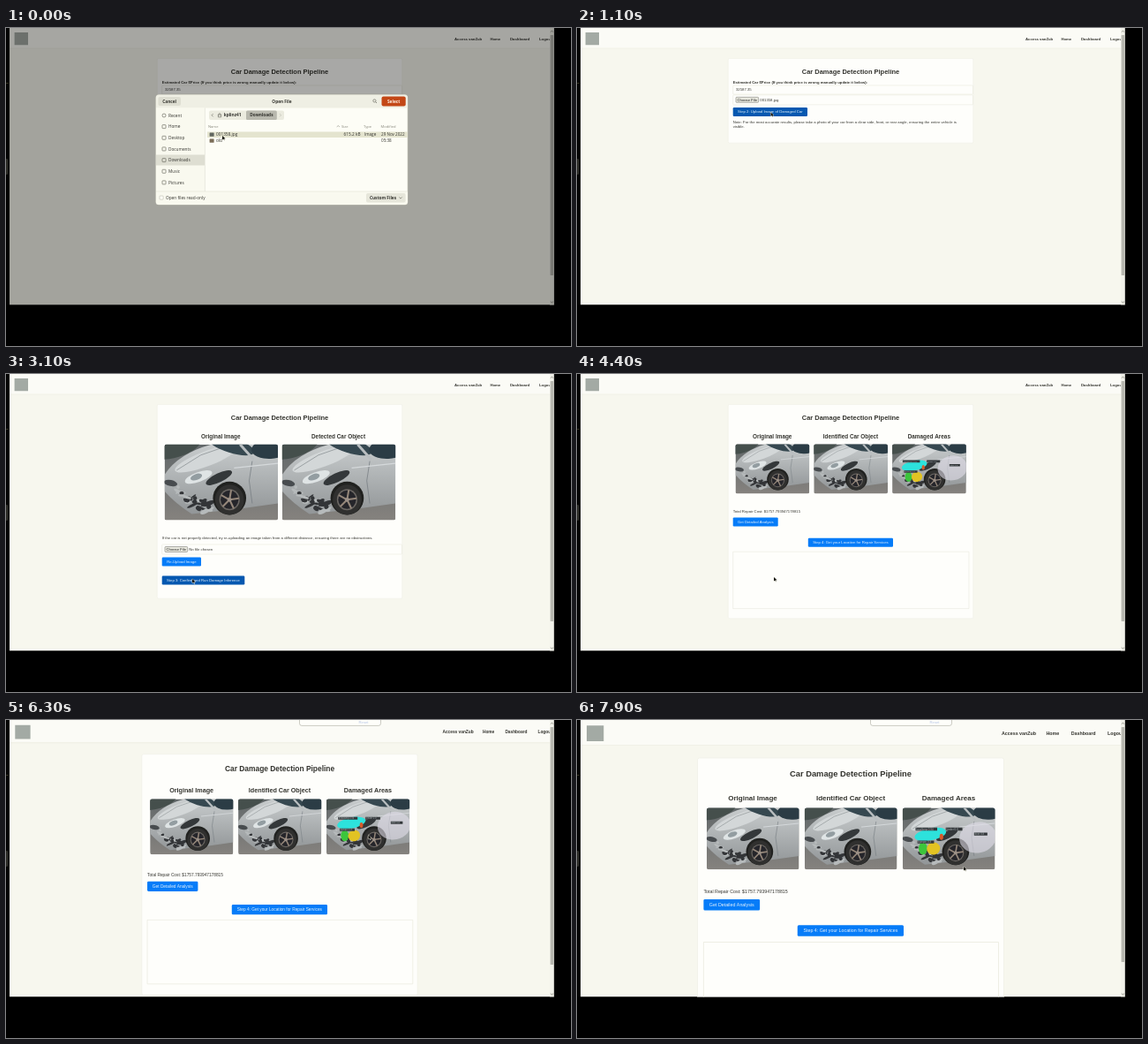
These frames come from a looping animation (640 by 360 pixels, 8 s). An HTML page with a canvas:

```html
<!DOCTYPE html>
<html lang="en">
<head>
<meta charset="utf-8">
<title>Car Damage Detection Pipeline</title>
<style>
html, body { margin: 0; width: 640px; height: 360px; overflow: hidden; background: #000; }
canvas { display: block; width: 640px; height: 360px; }
</style>
</head>
<body>
<canvas id="stage" width="640" height="360"></canvas>
<script>
const ctx = document.getElementById('stage').getContext('2d');
const LOOP = 8000, STEP = 100;
const WEB = '"Liberation Sans", Arial, sans-serif';
const DESK = '"Open Sans", sans-serif';
const BODY = 4.26, INK = '#34342f', RULE = '#e9e9dd';
const VIEW = { left: 4, right: 616, mid: 310, width: 612, bottom: 313.5 };
const CARD = { left: 171.2, inner: 176.7, top: 34.4, width: 277.6 };

// Each move starts at `at`, lasts `for` ms and ends at (x, y).
const moves = [
  { at: 200, for: 800, x: 219.5, y: 95.5 },
  { at: 1200, for: 700, x: 216, y: 208 },
  { at: 1900, for: 500, x: 207, y: 213 },
  { at: 2500, for: 600, x: 211, y: 232 },
  { at: 3900, for: 500, x: 223, y: 230 },
  { at: 4700, for: 1500, x: 410, y: 130 },
  { at: 6200, for: 1100, x: 430, y: 143 },
  { at: 7700, for: 200, x: 438, y: 166 }
];

const clamp = v => Math.min(1, Math.max(0, v));
const ease = k => k * k * (3 - 2 * k);

function pointerAt(t) {
  let x = 245, y = 122;
  for (const m of moves) {
    const k = ease(clamp((t - m.at) / m.for));
    x += (m.x - x) * k;
    y += (m.y - y) * k;
  }
  return { x, y };
}

function seeded(seed) {
  return () => (seed = seed * 16807 % 2147483647) / 2147483647;
}

function box(x, y, w, h, fill, r = 0, stroke) {
  ctx.beginPath();
  ctx.roundRect(x, y, w, h, r);
  if (fill) { ctx.fillStyle = fill; ctx.fill(); }
  if (stroke) { ctx.strokeStyle = stroke; ctx.lineWidth = 0.6; ctx.stroke(); }
}

function oval(x, y, rx, ry, fill, tilt = 0) {
  ctx.beginPath();
  ctx.ellipse(x, y, rx, ry, tilt, 0, 7);
  ctx.fillStyle = fill;
  ctx.fill();
}

function line(color, width, ...pts) {
  ctx.beginPath();
  for (let i = 0; i < pts.length; i += 2) ctx.lineTo(pts[i], pts[i + 1]);
  ctx.strokeStyle = color;
  ctx.lineWidth = width;
  ctx.stroke();
}

// dx, dy give the direction and size of the arrow head
function chevron(x, y, dx, dy, color = '#5a5a50') {
  const side = dx ? [0, 1.6] : [1.6, 0];
  line(color, 0.6, x - side[0] - dx, y - side[1] - dy, x, y, x + side[0] - dx, y + side[1] - dy);
}

// y is the middle of the capitals
function text(str, x, y, { size = BODY, bold = false, align = 'left', color = INK, font = WEB } = {}) {
  ctx.font = `${bold ? 'bold ' : ''}${size}px ${font}`;
  ctx.textAlign = align;
  ctx.fillStyle = color;
  ctx.fillText(str, x, y + size * 0.35);
}

function button(label, x, y, w, pointer, idle = '#067cf8') {
  const over = pointer.x >= x && pointer.x <= x + w && pointer.y >= y && pointer.y <= y + 10;
  box(x, y, w, 10, over ? '#0658b0' : idle, 1.2);
  text(label, x + w / 2, y + 5, { align: 'center', color: '#eaf3fb' });
}

function heading(str, x) {
  text(str, x, 70.4, { size: 6.4, bold: true, align: 'center' });
}

function fileInput(y, name) {
  box(CARD.inner, y - 5.5, 271.8, 11, null, 0.8, RULE);
  box(180, y - 3, 25.6, 6, '#e8e8de', 0.8, '#80807a');
  text('Choose File', 192.8, y, { align: 'center', color: '#222' });
  text(name, 207.3, y);
}

function wheel(x, y) {
  oval(x, y - 2, 22, 22, '#20211f');
  oval(x, y, 19, 20, '#30302f');
  oval(x, y, 13.5, 14, '#6b6763');
  oval(x, y, 11.8, 12.3, '#25252a');
  for (let i = 0; i < 5; i++) {
    const a = i * Math.PI * 0.4 - 1.4;
    line('#95877a', 2.4, x, y, x + 12.5 * Math.cos(a), y + 13 * Math.sin(a));
  }
  oval(x, y, 2.8, 2.8, '#9c9188');
}

function brokenCorner() {
  const rnd = seeded(11);
  for (let i = 0; i < 34; i++) {
    const k = rnd(), x = 18 + 44 * k, y = 64 + 22 * k + 16 * (rnd() - 0.5);
    oval(x, y, 2 + 6 * rnd(), 1 + 2 * rnd(), i % 3 ? '#333538' : '#b6babb', 0.7 - 1.4 * rnd());
  }
}

function damageMarks() {
  oval(122, 48, 30, 25, 'rgba(225,222,234,.6)', -0.2);
  oval(45, 43, 26, 10, '#2de2dc', -0.2);
  oval(33, 66, 7, 10, '#3cc53c');
  oval(50, 66, 11, 10, '#e2c323', -0.3);
  oval(63, 47, 3, 5, '#d75b2b');
  [[21, 32, 'headlamp 0.94'], [70, 32, 'fender 0.9'], [116, 40, 'door 0.8'], [24, 53, 'bumper 0.9']].forEach(([x, y, s]) => {
    box(x, y, s.length * 2.7, 4.8, '#33373a');
    text(s, x + 1, y + 2.4, { size: 4.2, color: '#a9b3b5' });
  });
}

// A silver car with a broken front corner, in a 150 by 100 space
function carPhoto(x, y, w, damaged) {
  ctx.save();
  ctx.beginPath();
  ctx.roundRect(x, y, w, w * 2 / 3, 2);
  ctx.clip();
  ctx.translate(x, y);
  ctx.scale(w / 150, w / 150);

  const shade = (top, low) => {
    const g = ctx.createLinearGradient(0, 0, 0, 100);
    g.addColorStop(0, top);
    g.addColorStop(1, low);
    return g;
  };
  box(0, 0, 150, 100, shade('#62686a', '#85827e'));
  oval(15, 4, 34, 13, '#454f4c', -0.3);

  ctx.beginPath();
  ctx.moveTo(0, 40);
  ctx.quadraticCurveTo(18, 12, 62, 0);
  ctx.lineTo(150, 0);
  ctx.lineTo(150, 78);
  ctx.lineTo(100, 85);
  ctx.lineTo(36, 92);
  ctx.quadraticCurveTo(14, 78, 0, 62);
  ctx.fillStyle = shade('#c8cccd', '#8d9193');
  ctx.fill();

  oval(55, 19, 44, 10, '#d3d7d8', -0.36);
  line('#8b9193', 0.9, 16, 34, 48, 14, 74, 5);
  oval(88, 1, 32, 10, '#364850', 0.3);
  oval(140, 6, 25, 13, '#2b3c45', -0.05);
  line('#b9bec0', 3.5, 100, 0, 118, 20);
  line('#777e82', 0.9, 116, 22, 112, 48, 116, 78);
  line('#d5d9db', 1.4, 92, 31, 150, 25);

  oval(45, 43, 19, 6.5, '#dfe4e5', -0.35);
  oval(42, 43, 8, 4, '#939da1', -0.35);
  oval(8, 51, 9, 4, '#484c4f', 0.2);
  oval(72, 44, 19, 6, '#34383a', -0.45);
  brokenCorner();
  wheel(86, 73);
  if (damaged) damageMarks();
  ctx.restore();
}

function uploadPage(pointer, t) {
  const x = CARD.inner;
  text('Estimated Car $Price (If you think price is wrong manually update it below):', x, 61.5, { bold: true });
  box(x, 65, 271.8, 10, null, 0.8, RULE);
  text('32587.35', 180, 69.7);
  fileInput(81.3, t < 100 ? 'No file chosen' : '001358.jpg');
  button('Step 2: Upload Image of Damaged Car', x, 90, 84.3, pointer, '#0678d4');
  text('Note: For the most accurate results, please take a photo of your car from a clear side, front, or rear angle, ensuring the entire vehicle is', x, 107);
  text('visible.', x, 112);
}

function detectPage(pointer) {
  ['Original Image', 'Detected Car Object'].forEach((name, i) => {
    heading(name, 243.3 + i * 133.2);
    carPhoto(179.6 + i * 133.2, 79.8, 128.4);
  });
  text('If the car is not properly detected, try re-uploading an image taken from a different distance, ensuring there are no obstructions.', CARD.inner, 185.8);
  fileInput(198.5, 'No file chosen');
  button('Re-Upload Image', CARD.inner, 207.5, 44.3, pointer);
  button('Step 3: Confirm and Run Damage Inference', CARD.inner, 228.5, 93.6, pointer);
}

function resultPage(pointer) {
  ['Original Image', 'Identified Car Object', 'Damaged Areas'].forEach((name, i) => {
    heading(name, 221.2 + i * 88.8);
    carPhoto(179.5 + i * 88.8, 79.6, 83.7, i === 2);
  });
  text('Total Repair Cost: $1757.793947178815', CARD.inner, 155.5);
  button('Get Detailed Analysis', CARD.inner, 162.4, 51, pointer);
  button('Step 4: Get your Location for Repair Services', 261.8, 185.8, 96.2, pointer);
  box(CARD.inner, 201.2, 267.3, 64.4, null, 0, RULE);
}

function navBar(zoom) {
  box(VIEW.left, 0, VIEW.width, 22.7 * zoom, '#fbfbf6');
  box(VIEW.left, 22.7 * zoom, VIEW.width, 0.6, RULE);
  box(VIEW.left + 5.6 * zoom, 5 * zoom, 15.4 * zoom, 14.2 * zoom, '#a3aaa4');
  [['Access vanZub', 108], ['Home', 67.6], ['Dashboard', 45], ['Logout', 12]].forEach(([s, d]) =>
    text(s, VIEW.right - d * zoom, 12.2 * zoom, { size: BODY * zoom, bold: true }));
}

function scrollBar(zoom) {
  box(VIEW.right, 0, 4.8, VIEW.bottom, '#f2f2ea');
  box(616.6, 8, 3.6, 272 - 24 * (zoom - 1), '#b8b8b0', 0.5);
  chevron(618.4, 3.2, 0, -1.4);
  chevron(618.4, 311, 0, 1.4);
}

function dialog() {
  const t = (s, x, y, o) => text(s, x, y, { size: 4.75, font: DESK, ...o });
  const mid = { bold: true, align: 'center' };
  const edge = '#5a5a50', face = '#deded2', rule = '#d8d8cc';
  box(169.6, 75.4, 285.6, 124.8, '#fdfdf6', 3.5, '#a4a498');
  box(169.8, 75.6, 285.2, 14.8, '#efefe4', [3.5, 3.5, 0, 0]);
  box(169.8, 90.4, 55.4, 94.6, '#f9f9ef');
  box(169.8, 185, 285.2, 15, '#f9f9ef', [0, 0, 3.5, 3.5]);
  line(rule, 0.5, 225.4, 90.4, 225.4, 185);
  line(rule, 0.5, 170, 185, 455, 185);

  box(172.4, 77.9, 25.6, 10.2, face, 2);
  t('Cancel', 185.2, 83, mid);
  t('Open File', 312.5, 83, mid);
  box(415.8, 80.8, 3.2, 3.2, null, 1.6, edge);
  line(edge, 0.7, 418.6, 83.6, 420, 85);
  box(425.5, 77.6, 27.2, 10.8, '#c34716', 2);
  t('Select', 439.1, 83, { ...mid, color: '#fff3e8' });

  ['Recent', 'Home', 'Desktop', 'Documents', 'Downloads', 'Music', 'Pictures'].forEach((s, i) => {
    const y = 99 + i * 12.65;
    if (s === 'Downloads') box(170, y - 6, 55, 12, face);
    box(177, y - 2, 4, 4, null, i ? 0.6 : 2, edge);
    t(s, 184, y);
  });

  box(230, 93.4, 85, 10.6, '#ebebdf', 2);
  chevron(233, 98.7, -1.6, 0);
  chevron(242, 96.4, 0, -1.8);
  box(240.4, 98.2, 3.2, 2.6, null, 0, edge);
  t('kplinz41', 246.7, 98.7, { bold: true });
  box(272, 93.4, 34.8, 10.6, '#b8b8ae', 1.5);
  t('Downloads', 289.4, 98.7, mid);
  chevron(311.6, 98.7, 1.6, 0, '#b2b2a6');

  const columns = [229, 380, 405, 424.5];
  ['Name', 'Size', 'Type', 'Modified'].forEach((s, i) =>
    t(s, columns[i], 111.3, { size: 4.1, color: '#88887c' }));
  chevron(376.3, 110.6, 0, -1.3, '#88887c');
  box(228, 117.4, 226.8, 6.5, '#e4e4cf');
  ['001358.jpg', 'old'].forEach((s, i) => {
    box(230.6, 118.6 + i * 7, 5, 4.2, i ? '#7b6d58' : '#61665f', 0.5);
    t(s, 238, 120.7 + i * 7);
  });
  t('615.2 kB', 401.5, 120.7, { align: 'right' });
  t('Image', 406, 120.7, { size: 4.6 });
  t('29 Nov 2022', 425, 120.7, { size: 4.6 });
  t('05:38', 425, 127.7, { size: 4.6 });

  box(174, 190, 4.2, 4.2, '#fdfdf6', 0.8, '#bebeb2');
  t('Open files read-only', 181, 192.2);
  box(408, 187, 44.5, 10.4, '#e6e6da', 2);
  t('Custom Files', 427, 192.2, mid);
  chevron(447, 193.1, 0, 1.6);
}

function zoomBubble() {
  box(332.5, -4, 92, 10.4, '#fefefa', 2.5, '#a9a9a0');
  text('Reset', 405, 2.6, { align: 'center', color: '#b6c4e6' });
}

function drawPointer({ x, y }) {
  ctx.beginPath();
  ctx.moveTo(x, y);
  ctx.lineTo(x, y + 4.6);
  ctx.lineTo(x + 1.3, y + 3.5);
  ctx.lineTo(x + 2.4, y + 5.6);
  ctx.lineTo(x + 2.2, y + 3.2);
  ctx.lineTo(x + 3.5, y + 3.2);
  ctx.closePath();
  ctx.strokeStyle = '#f6f6ea';
  ctx.lineWidth = 0.8;
  ctx.stroke();
  ctx.fillStyle = '#15150f';
  ctx.fill();
}

function draw(t) {
  const zoom = t < 5300 ? 1 : t < 7000 ? 1.125 : 1.25;
  const [page, cardBottom] = t < 1300 ? [uploadPage, 130.2] : t < 4000 ? [detectPage, 254.2] : [resultPage, 276.8];
  const pointer = pointerAt(t);
  const dim = 0.34 * Math.exp(-t / 165);

  box(0, 0, 640, 360, '#000');
  line('#45432c', 0.7, 0, 62.5, 3, 62.5);
  box(-2, 148, 4.5, 18, '#2b2b26', 2);

  ctx.save();
  ctx.beginPath();
  ctx.rect(VIEW.left, 0, VIEW.width, VIEW.bottom);
  ctx.clip();
  box(VIEW.left, 0, VIEW.width, VIEW.bottom, '#f7f7ee');
  navBar(zoom);
  ctx.translate(VIEW.mid, 0);
  ctx.scale(zoom, zoom);
  ctx.translate(-VIEW.mid, 0);
  box(CARD.left, CARD.top, CARD.width, cardBottom - CARD.top, '#fefefb', 1.6, '#efefe6');
  text('Car Damage Detection Pipeline', VIEW.mid, 48.9, { size: 7.48, bold: true, align: 'center' });
  page({ x: VIEW.mid + (pointer.x - VIEW.mid) / zoom, y: pointer.y / zoom }, t);
  ctx.restore();

  scrollBar(zoom);
  if (zoom > 1) zoomBubble();
  box(VIEW.left, 0, 616.8, VIEW.bottom, `rgba(0,0,0,${dim})`);
  ctx.globalAlpha = clamp(1 - t / 200);
  if (t < 200) dialog();
  ctx.globalAlpha = 1;
  drawPointer(pointer);
}

function tick(now) {
  draw(Math.floor(now % LOOP / STEP) * STEP);
  requestAnimationFrame(tick);
}
requestAnimationFrame(tick);
</script>
</body>
</html>
```
